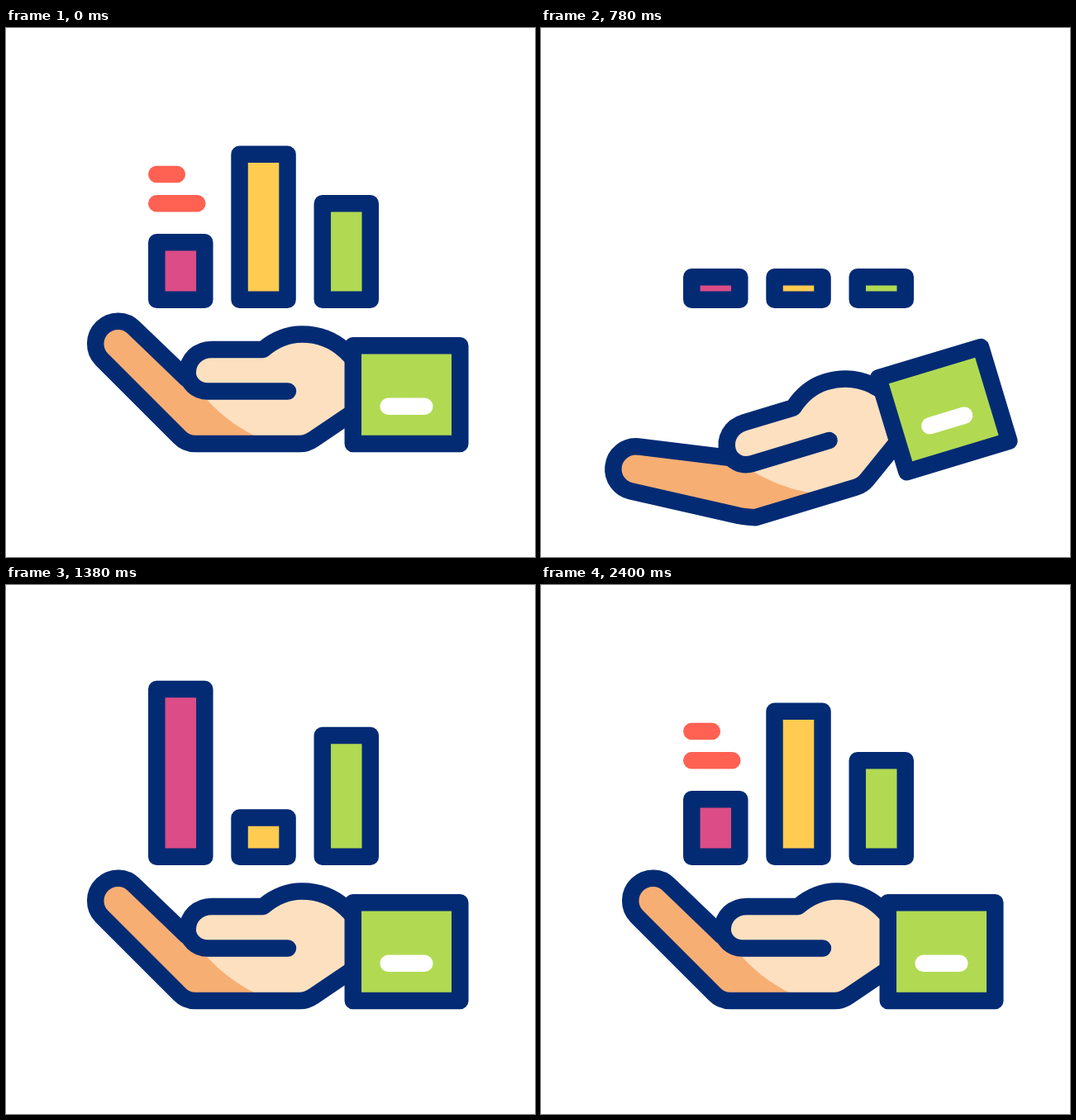
An HTML page with a canvas for the animation above (2420 ms loop, 640 by 640 pixels).

```html
<!DOCTYPE html>
<html lang="en">
<head>
<meta charset="utf-8">
<title>Growth in hand</title>
<style>
  html, body { margin: 0; width: 100%; height: 100%; overflow: hidden; background: #fff; }
  canvas { display: block; width: 640px; height: 640px; }
</style>
</head>
<body>
<canvas id="stage" width="640" height="640"></canvas>
<script>
const ctx = document.getElementById('stage').getContext('2d');
const LOOP = 2420;
const LINE = 20.5;
const NAVY = '#032b74', GREEN = '#b1da52', YELLOW = '#ffcb50', PINK = '#dc4c87';
const RED = '#ff6152', SKIN = '#fce0bf', SHADE = '#f7ae73';

const PIVOT = { x: 546.3, y: 443.5 };
const TILT = 16.8;

const LEFT = 182.3, BAR_GAP = 100.25, BAR_WIDTH = 58, BAR_BASE = 328.7;
const BAR_LOW = 291;
const BEAT = 385, SETTLED = 2096;

// Each bar sinks from rest, then leaps through its peaks, one per beat, back to rest.
const bars = [
  { color: PINK, rest: 249, leaves: 1003, peaks: [106, 283] },
  { color: YELLOW, rest: 142.5, leaves: 780, peaks: [125, 275, 206] },
  { color: GREEN, rest: 202, leaves: 780, peaks: [219, 175, 117] }
];

const palm = new Path2D(
  'M341 439.5 H244 C230 439.5 219.7 429 219.7 417 C219.7 401 232 389 249 389 H311' +
  'C325 377 341 370.5 358 370.5 C379 370.5 397 378 411 391 L420 400');
const light = new Path2D(palm);
light.addPath(new Path2D('M311 389 L420 400 V465 L372 497.5 L355 503 H322' +
  'C290 490 262 473 234 439.5 H341 Z'));

const rad = deg => deg * Math.PI / 180;
const lerp = (a, b, k) => a + (b - a) * k;

function ease(t, from, to) {
  const k = Math.min(1, Math.max(0, (t - from) / (to - from)));
  return k * k * (3 - 2 * k);
}

function paint(path, fill, stroke) {
  if (fill) { ctx.fillStyle = fill; ctx.fill(path); }
  if (stroke) { ctx.strokeStyle = stroke; ctx.stroke(path); }
}

function box(x, y, w, h, fill) {
  const path = new Path2D();
  path.rect(x, y, w, h);
  paint(path, fill, NAVY);
}

function dash(x, y, length, color) {
  paint(new Path2D(`M${x} ${y} h${length}`), null, color);
}

function barTop({ rest, leaves, peaks }, t) {
  let top = lerp(rest, BAR_LOW, ease(t, 0, 617));
  peaks.concat(rest).forEach((stop, i) => {
    const end = SETTLED - BEAT * (peaks.length - i);
    top = lerp(top, stop, ease(t, i ? end - BEAT : leaves, end));
  });
  return top;
}

function drawBar(bar, i, t) {
  const y = barTop(bar, t) + LINE / 2;
  box(LEFT + BAR_GAP * i, y, BAR_WIDTH, BAR_BASE - y, bar.color);
}

function drawDashes(t) {
  const leaving = t < LOOP / 2;
  const grow = leaving ? 1 : ease(t, 2160, 2400);
  if (!grow) return;
  const x = LEFT - (leaving ? 49 * (t / 300) ** 2.3 : 0);
  dash(x, 177, 24.5 * grow, RED);
  dash(x, 212.2, 49 * grow, RED);
}

// The finger opens by moving its round tip; the lines follow to a fixed heel.
function fingerPath(bend) {
  const path = new Path2D();
  path.moveTo(219, 424.5);
  path.arc(lerp(135.5, 107, bend), lerp(382, 405, bend), 27.3,
    rad(lerp(-44, -67.5, bend)), rad(lerp(136, 120, bend)), true);
  path.lineTo(210, 495);
  path.quadraticCurveTo(217.5, lerp(503, 499, bend), 229, 503);
  path.lineTo(355, 503);
  path.bezierCurveTo(362, 503, 367, 501, 372, 497.5);
  path.lineTo(420, 465);
  return path;
}

function drawHand(bend) {
  ctx.save();
  ctx.translate(PIVOT.x, PIVOT.y);
  ctx.rotate(rad(-TILT * bend));
  ctx.translate(-PIVOT.x, -PIVOT.y);

  const finger = fingerPath(bend);
  paint(finger, SHADE);
  paint(light, SKIN);
  paint(finger, null, NAVY);
  paint(palm, null, NAVY);

  box(419.8, 384.3, 129.5, 118.8, GREEN);
  dash(462.7, 457.7, 43.6, '#fff');
  ctx.restore();
}

function frame(t) {
  ctx.fillStyle = '#fff';
  ctx.fillRect(0, 0, 640, 640);
  ctx.lineWidth = LINE;
  ctx.lineCap = ctx.lineJoin = 'round';
  drawDashes(t);
  bars.forEach((bar, i) => drawBar(bar, i, t));
  drawHand(ease(t, 0, 424) - ease(t, 865, 1186));
}

const start = performance.now();
function tick() {
  frame((performance.now() - start) % LOOP);
  requestAnimationFrame(tick);
}
tick();
</script>
</body>
</html>
```
